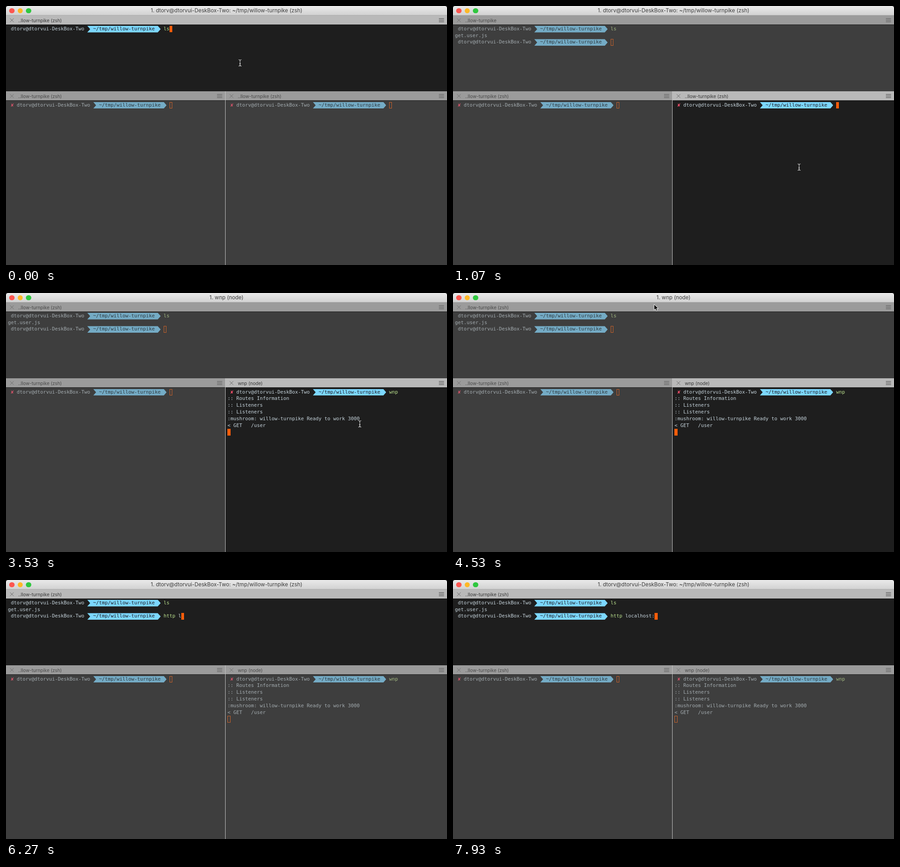
Recreate the animation shown at these times as an HTML page. Size 976 px wide and 574 px high, loop 8 s.

```html
<!DOCTYPE html>
<html lang="en">
<head>
<meta charset="utf-8">
<title>Terminal</title>
<style>
html, body { margin: 0; width: 100%; height: 100%; overflow: hidden; background: #222; }
#win { position: absolute; left: 0; top: 0; width: 976px; height: 574px; overflow: hidden; border-radius: 5px 5px 0 0; background: #c2c2c2; }
#bar { position: absolute; left: 0; top: 0; width: 100%; height: 20px; border-bottom: 1px solid #adadad;
  background: linear-gradient(#e9e9e9, #d2d2d2); }
#title { text-align: center; font: 11.8px/21px Inter, "Open Sans", sans-serif; color: #3c3c3c; white-space: pre; }
.light { position: absolute; top: 4.8px; width: 11.4px; height: 11.4px; border-radius: 50%; }

.pane { position: absolute; overflow: hidden; background: #3e3e3e;
  --tab: #9b9b9b; --tabtext: #484848; --icon: #6c6c6c;
  --text: #a3abaf; --ok: #a3b981; --bad: #d4546a; --path: #74abc5; --pathtext: #2f3a40; }
.pane.on { background: #1e1e1e;
  --tab: #b9b9b9; --tabtext: #363636; --icon: #666;
  --text: #c6d4dc; --ok: #bce38e; --bad: #ff5370; --path: #7cd7ff; --pathtext: #1e1e1e; }
#p0 { left: 0; top: 21px; width: 976px; height: 168px; --top: 22.8px; }
#p1 { left: 0; top: 189px; width: 485px; height: 385px; --top: 23.6px; }
#p2 { left: 486px; top: 189px; width: 490px; height: 385px; --top: 23.6px; }
.tab { height: 20px; border-bottom: 1px solid #1c1c1c; background: var(--tab); }
.tab span { position: absolute; left: 27px; top: 0; font: 10.2px/22px Inter, "Open Sans", sans-serif; color: var(--tabtext); white-space: pre; }
.tab svg { position: absolute; top: 0; fill: none; stroke: var(--icon); }
.close { left: 0; }
.menu { right: 0; }
.lines { position: absolute; left: 4.3px; top: var(--top); color: var(--text);
  font: 10.8px/14.8px "DejaVu Sans Mono", "Liberation Mono", monospace; white-space: pre; }
.lines div { height: 14.8px; }
.path { display: inline-block; height: 14.8px; vertical-align: top; background: var(--path); color: var(--pathtext);
  clip-path: polygon(0 0, 96% 0, 100% 50%, 96% 100%, 0 100%, 4% 50%); }
.ok { color: var(--ok); }
.bad { color: var(--bad); }
.cur { display: inline-block; width: 1ch; height: 14.6px; vertical-align: top; box-shadow: inset 0 0 0 1px #c9622a; }
.on .cur { background: #ff5d0a; box-shadow: none; }
#mouse { position: absolute; left: 0; top: 0; overflow: visible; }
</style>
</head>
<body>
<div id="win">
  <div id="bar">
    <i class="light" style="left:7.2px;background:#fc5650"></i>
    <i class="light" style="left:25.8px;background:#fdb827"></i>
    <i class="light" style="left:44.2px;background:#2fc73f"></i>
    <div id="title"></div>
  </div>
  <div class="pane" id="p0"></div>
  <div class="pane" id="p1"></div>
  <div class="pane" id="p2"></div>
  <svg id="mouse" width="1" height="1">
    <g id="beam" fill="none" stroke-linecap="round">
      <path id="stem" d="M-3 -7Q0 -7 0 -5Q0 -7 3 -7M0 -5V5M-3 7Q0 7 0 5Q0 7 3 7M-1.5 2H1.5" stroke="#111" stroke-width="2.6"/>
      <use href="#stem"/>
      <path d="M-3 -7Q0 -7 0 -5Q0 -7 3 -7M0 -5V5M-3 7Q0 7 0 5Q0 7 3 7M-1.5 2H1.5" stroke="#eee" stroke-width="1.1"/>
    </g>
    <path id="arrow" d="M0 0V13L3 10.2L5.1 14.8L7.4 13.8L5.4 9.3H9.4Z" fill="#000" stroke="#fff" stroke-width="1"/>
  </svg>
</div>
<script>
const LOOP = 8000;
const HOST = 'dtorv@dtorvui-DeskBox-Two';
const DIR = '~/tmp/willow-turnpike';
const TOOL = 'wnp';
const SHORT = '..llow-turnpike';
const HOME_TITLE = `1. ${HOST}: ${DIR} (zsh)`;

// Event times in ms
const LS_RUN = 130, TO_RIGHT = 1070, TOOL_RUN = 2470, TOOL_UP = 2600, TO_TOP = 4730;
const TOOL_KEYS = [2000, 2130, 2270];
const HTTP_KEYS = [5600, 5730, 5800, 5930, 6070, 6270, 6470, 6600, 7330, 7470, 7600, 7670, 7730, 7870, 7930];
const OUTPUT = [
  [2800, ':: Routes Information'],
  [2870, ':: Listeners'],
  [2930, ':: Listeners'],
  [3000, `:mushroom: ${DIR.slice(6)} Ready to work 3000`],
  [3070, '&lt; GET   /user']
];

// Pointer tracks: [time, x, y], shown from the first point until hideAt
const TRACKS = [
  { from: 0, hideAt: 2000, points: [[0, 518, 126], [70, 518, 126], [870, 770, 355], [1000, 766, 357]] },
  { from: 2930, hideAt: 5600, points: [[2930, 766, 357], [3130, 772, 392], [3600, 784, 284], [4470, 445, 25]] }
];

const $ = id => document.getElementById(id);
const CURSOR = '<i class="cur"></i>';
const prompt = failed =>
  `${failed ? ' <span class="bad">✘</span>' : ''} ${HOST} <span class="path">  ${DIR}  </span> `;
const pressed = (keys, t) => keys.filter(k => t >= k).length;

function command(text, known) {
  const [word] = text.split(' ');
  return `<span class="${word === known ? 'ok' : 'bad'}">${word}</span>${text.slice(word.length)}`;
}

function topLines(t) {
  const ls = prompt() + command('ls', 'ls');
  if (t < LS_RUN) return [ls + CURSOR];
  const typed = 'http localhost:'.slice(0, pressed(HTTP_KEYS, t));
  return [ls, 'get.user.js', prompt() + command(typed, 'http') + CURSOR];
}

function rightLines(t) {
  const line = prompt(true) + command(TOOL.slice(0, pressed(TOOL_KEYS, t)), TOOL);
  if (t < TOOL_RUN) return [line + CURSOR];
  return [line, ...OUTPUT.filter(o => t >= o[0]).map(o => o[1]), CURSOR];
}

const panes = [0, 1, 2].map(i => {
  const el = $('p' + i);
  el.innerHTML = `<div class="tab">
    <svg class="close" width="24" height="20"><path d="M9 6.5L17 14.5M17 6.5L9 14.5"/></svg>
    <span></span>
    <svg class="menu" width="24" height="20"><path d="M6 7H17.5M6 10.5H17.5M6 14H17.5" stroke-width="1.4"/></svg>
  </div><div class="lines"></div>`;
  return { el, tab: el.querySelector('span'), lines: el.querySelector('.lines'), html: '' };
});

function setPane(i, active, tab, lines) {
  const pane = panes[i];
  const html = lines.map(l => `<div>${l}</div>`).join('');
  pane.el.classList.toggle('on', active);
  if (pane.tab.textContent !== tab) pane.tab.textContent = tab;
  if (pane.html !== html) pane.lines.innerHTML = pane.html = html;
}

function pointerAt(points, t) {
  const next = points.findIndex(p => p[0] > t);
  if (next < 0) return points[points.length - 1].slice(1);
  const [t0, x0, y0] = points[next - 1], [t1, x1, y1] = points[next];
  const u = (t - t0) / (t1 - t0), k = u * u * (3 - 2 * u);
  return [x0 + (x1 - x0) * k, y0 + (y1 - y0) * k];
}

function drawPointer(t) {
  const track = TRACKS.find(p => t >= p.from && t < p.hideAt);
  $('mouse').style.display = track ? '' : 'none';
  if (!track) return;
  const [x, y] = pointerAt(track.points, t).map(Math.round);
  const overBar = y < 41 || (y >= 189 && y < 209);
  $('beam').style.display = overBar ? 'none' : '';
  $('arrow').style.display = overBar ? '' : 'none';
  $('mouse').style.transform = `translate(${x}px, ${y}px)`;
}

function draw(t) {
  const right = t >= TO_RIGHT && t < TO_TOP;
  const idle = SHORT + ' (zsh)';
  const toolTab = t < TOOL_RUN ? idle : t < TOOL_UP ? TOOL : TOOL + ' (node)';
  const title = right && t >= TOOL_RUN ? `1. ${TOOL} (${t < TOOL_UP ? 'zsh' : 'node'})` : HOME_TITLE;
  if ($('title').textContent !== title) $('title').textContent = title;
  setPane(0, !right, t >= LS_RUN && t < 1200 ? SHORT : idle, topLines(t));
  setPane(1, false, idle, [prompt(true) + CURSOR]);
  setPane(2, right, toolTab, rightLines(t));
  drawPointer(t);
}

const start = performance.now();
function tick() {
  draw((performance.now() - start) % LOOP);
  requestAnimationFrame(tick);
}
tick();
</script>
</body>
</html>
```
